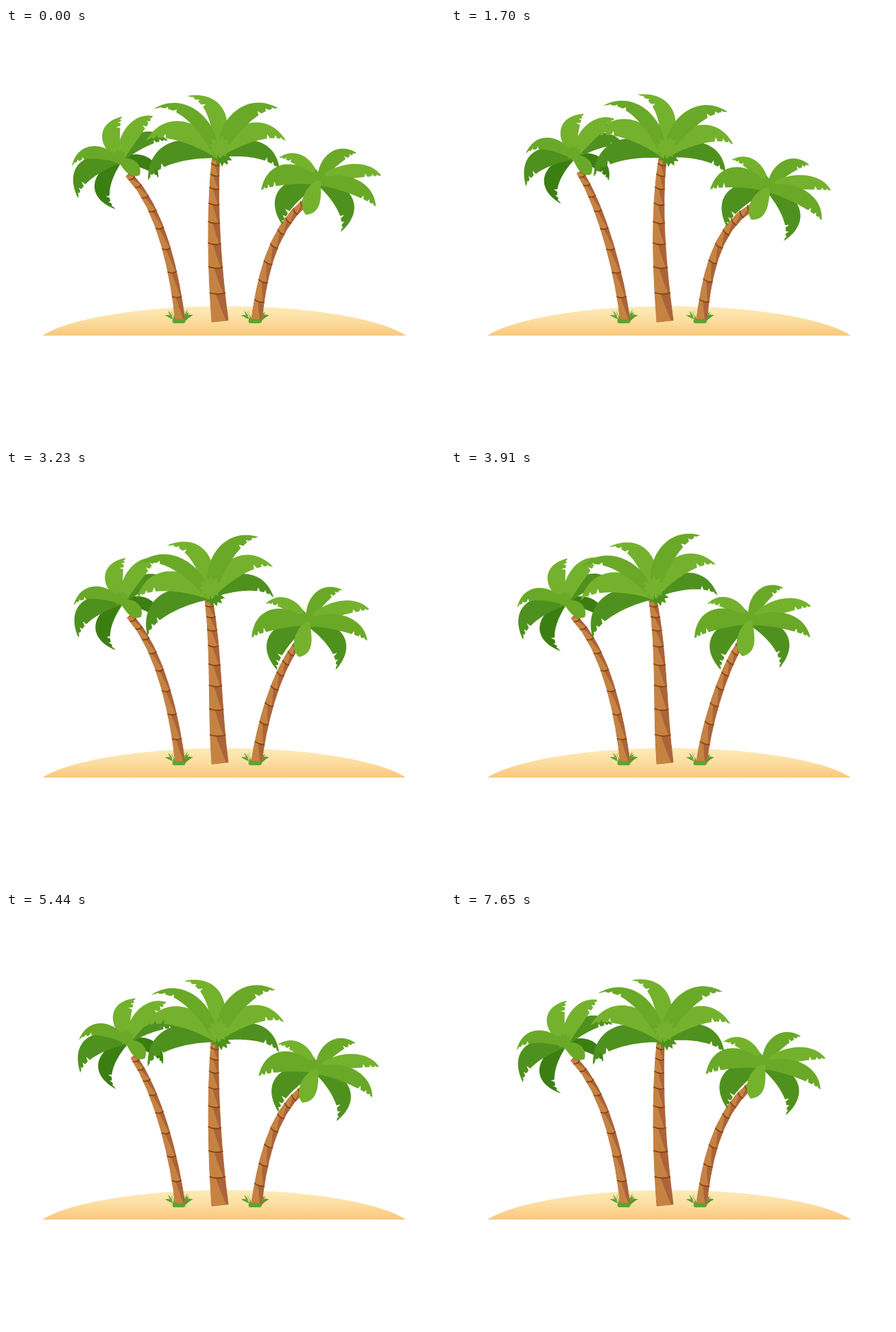
An HTML page with a canvas that plays this animation: 640x603 px, repeating every 7820 ms.

```html
<!DOCTYPE html>
<html lang="en">
<head>
<meta charset="utf-8">
<title>Palm island</title>
<style>
html, body { margin: 0; width: 100%; height: 100%; overflow: hidden; background: #fff; }
canvas { display: block; }
</style>
</head>
<body>
<canvas id="stage" width="640" height="603"></canvas>
<script>
const ctx = document.getElementById('stage').getContext('2d');
const LOOP = 7820, STEP = 170;
const LIGHT = '#74b22e', MID = '#6aa928', DARK = '#4f911e', DEEP = '#3b7f12';

const mix = (a, b, t) => a + (b - a) * t;
const range = (n, fn) => Array.from({ length: n }, (_, i) => fn(i));

function cubic([a, b, c, d], s) {
  const r = 1 - s;
  return [0, 1].map(k =>
    r * r * r * a[k] + 3 * r * r * s * b[k] + 3 * r * s * s * c[k] + s * s * s * d[k]);
}

function polygon(pts) {
  const path = new Path2D();
  for (const [x, y] of pts) path.lineTo(x, y);
  path.closePath();
  return path;
}

function fill(color, path) {
  ctx.fillStyle = color;
  ctx.fill(path);
}

// Two harmonics of the loop, zero at its start.
const wave = (c1, s1, c2, s2) => p =>
  c1 * (Math.cos(p) - 1) + s1 * Math.sin(p) + c2 * (Math.cos(2 * p) - 1) + s2 * Math.sin(2 * p);

// A frond arches from the hub and droops to its tip; bow and core set
// the heights of its upper and lower edges as parts of its length.
const frond = (color, tx, ty, bow, core, torn = true) => ([hx, hy]) => {
  const dx = tx - hx, dy = ty - hy, side = Math.sign(dx);
  const at = (along, up) => [hx + dx * along + dy * up * side, hy + dy * along - dx * up * side];
  const outer = [at(0, 0), at(0.2, bow * 0.75), at(0.8, bow), at(1, 0)];
  const inner = [at(1, 0), at(0.8, core), at(0.3, core * 0.4), at(0, -0.08)];
  const n = 44, tears = torn ? [4, 8, 13] : [];
  const lower = range(n, i => {
    const a = cubic(inner, (i + 1) / n), b = cubic(outer, 1 - (i + 1) / n);
    const d = tears.includes(i + 1) ? 0.28 : 0;
    return [mix(a[0], b[0], d), mix(a[1], b[1], d)];
  });
  return { color, path: polygon([...range(n + 1, i => cubic(outer, i / n)), ...lower]) };
};

// Ragged patch where the fronds meet.
const heart = (color, ox, oy, size) => ([hx, hy]) => ({
  color,
  path: polygon(range(22, i => {
    const a = i * Math.PI / 11, r = i % 2 ? size * 0.65 : size;
    return [hx + ox + r * Math.sin(a), hy + oy + r * Math.cos(a)];
  }))
});

function palm(hub, trunk, width, pose, parts) {
  return { hub, trunk, width, pose, parts: parts.map(make => make(hub)) };
}

const leftSway = wave(-0.15, 0.9, -4.6, 1.2);
const leftPalm = palm([165, 192], [[254, 427], [247, 365], [228, 262], [178, 213]], [14, 9],
  p => { const r = leftSway(p); return [r, 1.3 * r, -0.55 * r]; }, [
    frond(DEEP, 222, 218, 0.5, 0.1),
    frond(DARK, 236, 164, 0.5, 0.1),
    frond(DEEP, 160, 264, 0.7, 0.28),
    frond(DARK, 105, 248, 0.66, 0.18),
    frond(LIGHT, 169, 129, 0.65, 0.05),
    frond(LIGHT, 214, 128, 0.38, -0.05),
    frond(MID, 96, 201, 0.54, 0.2),
    heart(MID, 0, -4, 12),
    frond(MID, 195, 214, 0.5, -0.4, false)
  ]);

const centerSway = wave(7.4, 0.5, -4.07, 1.9);
const centerPalm = palm([309, 182], [[312, 427], [304, 350], [300, 265], [306, 190]], [24, 11],
  p => { const r = centerSway(p); return [r, 0.94 * r, 0.1 * r]; }, [
    frond(DARK, 207, 222, 0.54, 0.17),
    frond(DARK, 399, 208, 0.52, 0.17),
    heart(DARK, 6, 4, 16),
    frond(LIGHT, 264, 99, 0.59, 0.26),
    frond(LIGHT, 204, 164, 0.52, 0.15),
    frond(LIGHT, 408, 164, 0.52, 0.15),
    frond(MID, 215, 118, 0.45, 0.25),
    frond(MID, 397, 117, 0.47, 0.16),
    heart(LIGHT, 3, -9, 17)
  ]);

const rightMoves = [wave(4.25, 1.2, -4.5, 2.1), wave(10, 2.2, -6.1, 2.2), wave(1.5, 1.2, -4.7, 2)];
const rightPalm = palm([455, 222], [[365, 427], [372, 375], [383, 297], [438, 252]], [15, 10],
  p => rightMoves.map(move => move(p)), [
    frond(DARK, 403, 287, 0.65, 0.11),
    frond(DARK, 488, 297, 0.65, 0.2),
    frond(LIGHT, 398, 189, 0.46, 0.1),
    frond(MID, 511, 182, 0.5, 0.06),
    frond(LIGHT, 547, 215, 0.33, 0),
    frond(MID, 539, 260, 0.4, 0.05),
    frond(MID, 372, 236, 0.56, 0.05),
    heart(MID, 0, -3, 15),
    frond(LIGHT, 437, 272, 0.35, -0.45, false)
  ]);

function drawTrunk(trunk, width, dx, dy) {
  // The top follows the crown while the middle bends slightly the other way.
  const center = s => {
    const [x, y] = cubic(trunk, s), k = s * s * (3 * s - 2);
    return [x + dx * k, y + dy * k];
  };
  // Point at height s, from -1 (left edge) to 1 (right edge).
  const at = (s, side) => {
    const a = center(s - 0.01), b = center(s + 0.01), [x, y] = center(s);
    const vx = b[0] - a[0], vy = b[1] - a[1];
    const w = mix(...width, s) / 2 * side / Math.hypot(vx, vy);
    return [x - vy * w, y + vx * w];
  };
  const edge = (from, to, sideA, sideB) =>
    range(9, i => at(mix(from, to, i / 8), mix(sideA, sideB, i / 8)));
  const body = polygon([...edge(0, 1, -1, -1), ...edge(1, 0, 1, 1)]);
  const joint = i => 0.18 * i - 0.0075 * i * i;

  ctx.lineJoin = 'round';
  ctx.lineWidth = 1;
  ctx.strokeStyle = '#b36f3a';
  ctx.stroke(body);
  fill('#c58342', body);
  for (let i = 0; i < 9; i++) {
    const lo = joint(i), hi = Math.min(joint(i + 1), 1);
    fill('#ab633b', polygon([...edge(lo, hi, 0.75, -0.25), ...edge(hi, lo, 1, 1)]));
  }
  ctx.strokeStyle = '#86410f';
  ctx.lineWidth = 1.6;
  for (let i = 1; i < 9; i++) {
    const s = joint(i);
    ctx.beginPath();
    ctx.moveTo(...at(s + 0.008, -1.08));
    ctx.quadraticCurveTo(...at(s - 0.014, 0.1), ...at(s, 1.08));
    ctx.stroke();
  }
}

function drawPalm({ hub: [hx, hy], trunk, width, pose, parts }, phase) {
  const [turn, dx, dy] = pose(phase), a = turn * Math.PI / 180;
  const rx = trunk[3][0] - hx, ry = trunk[3][1] - hy;
  drawTrunk(trunk, width,
    dx + rx * (Math.cos(a) - 1) - ry * Math.sin(a),
    dy + rx * Math.sin(a) + ry * (Math.cos(a) - 1));
  ctx.save();
  ctx.translate(hx + dx, hy + dy);
  ctx.rotate(a);
  ctx.translate(-hx, -hy);
  for (const { color, path } of parts) fill(color, path);
  ctx.restore();
}

const sand = new Path2D('M53 448C91 423 200 405 318 405C440 405 546 423 583 448Z');
const sandFill = ctx.createLinearGradient(0, 405, 0, 448);
sandFill.addColorStop(0, '#fdebb9');
sandFill.addColorStop(0.5, '#fcdd9f');
sandFill.addColorStop(1, '#fac77c');

// Grass blades fan out to both sides of a trunk.
function drawBlades(x, y) {
  for (let i = 0; i < 10; i++) {
    const side = i % 2 ? 1 : -1, a = 0.45 + 0.17 * (i >> 1), len = 21 + 2 * Math.sin(i * 5);
    const tx = x + side * len * Math.sin(a), ty = y - len * Math.cos(a);
    const bend = y - len * 0.55, root = x + side * 5;
    fill(i % 4 < 2 ? '#559b2b' : '#78ae3c', new Path2D(
      `M${root - 3} ${y}Q${mix(root, tx, 0.4)} ${bend} ${tx} ${ty}` +
      `Q${mix(root, tx, 0.6)} ${bend + 6} ${root + 3} ${y}Z`));
  }
}

function drawTuft(x, y) {
  ctx.fillStyle = '#5ba530';
  ctx.beginPath();
  for (const i of [-1, 0, 1]) ctx.ellipse(x + 5.5 * i, y - 1, 4, 3.2, 0, 0, 2 * Math.PI);
  ctx.fill();
}

function draw(t) {
  const phase = t / LOOP * 2 * Math.PI;
  ctx.fillStyle = '#fff';
  ctx.fillRect(0, 0, 640, 603);
  fill(sandFill, sand);
  const tufts = [[252, 428], [363, 428]];
  for (const spot of tufts) drawBlades(...spot);
  for (const tree of [leftPalm, centerPalm, rightPalm]) drawPalm(tree, phase);
  for (const spot of tufts) drawTuft(...spot);
}

const start = performance.now();
function tick() {
  const t = (performance.now() - start) % LOOP;
  draw(Math.floor(t / STEP) * STEP);
  requestAnimationFrame(tick);
}
tick();
</script>
</body>
</html>
```
